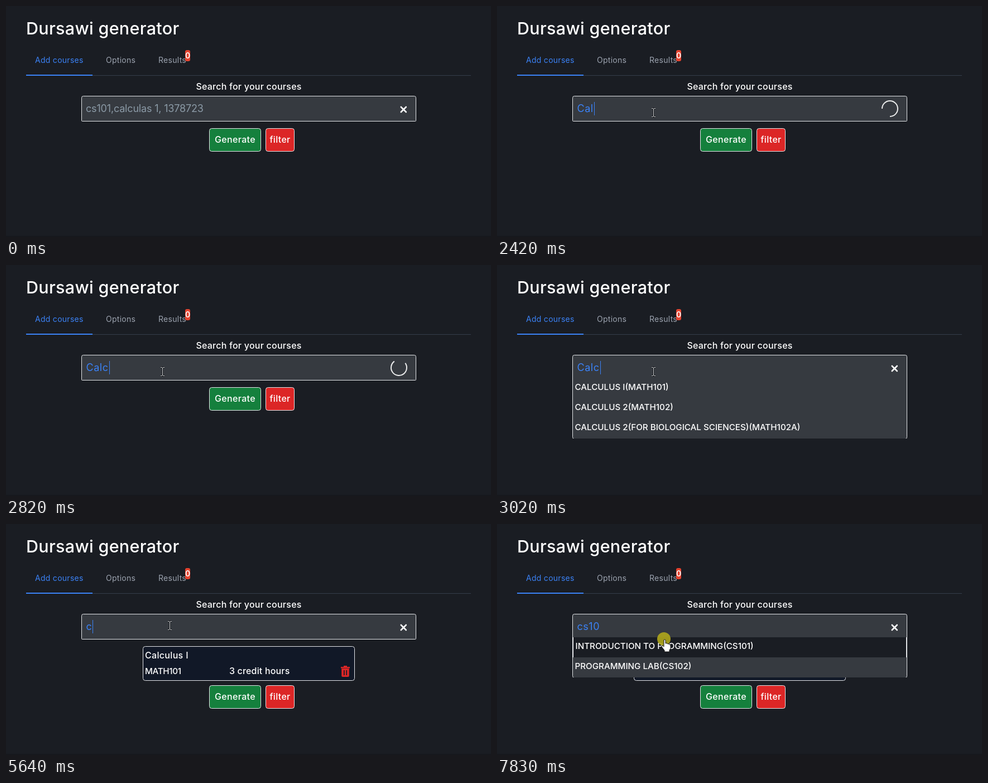
These frames come from a looping animation (869x414 px, 8 s). An HTML page with a canvas:

```html
<!DOCTYPE html>
<html lang="en">
<head>
<meta charset="utf-8">
<title>Course generator</title>
<style>
  html, body { margin: 0; width: 100%; height: 100%; overflow: hidden; background: #1a1d23; }
  canvas { display: block; width: 869px; height: 414px; }
</style>
</head>
<body>
<canvas id="stage" width="869" height="414"></canvas>
<script>
const ctx = document.getElementById("stage").getContext("2d");
const LOOP = 8000;
const FONT = "Inter, 'Open Sans', sans-serif";
const C = {
  bg: "#1a1d23", field: "#363a40", line: "#e4e6e9", rule: "#343e4b", blue: "#3b82f6",
  grey: "#9ca3af", hint: "#8b9aa6", green: "#15803d", red: "#dc2626", card: "#111827", white: "#fff"
};

const MEDICAL = [
  "INRTODUCTION TO MEDICINE AND MEDICAL TERMINOLOGY(MED173)",
  "MOLECULAR GENETICS PRACTICAL(MED211B)",
  "MEDICAL COMMUNICATIONS SKILLS(MED301)",
  "CLINICAL & COMMUNICATION SKILLS(MED411)",
  "ADVANCED CLINICAL PHARMACOLOGY AND THERAPEUTICS(MED751)",
  "BASIC MANAGEMENT OF MEDICAL EMERGENCIES(PARA233)",
  "MEDICAL ETHICS(MED502)"
];
const CALCULUS = [
  "CALCULUS I(MATH101)",
  "CALCULUS 2(MATH102)",
  "CALCULUS 2(FOR BIOLOGICAL SCIENCES)(MATH102A)"
];
const CODING = ["INTRODUCTION TO PROGRAMMING(CS101)", "PROGRAMMING LAB(CS102)"];

// Each step changes only the listed parts of the state.
const STEPS = [
  [0, { typed: "", caret: false, busy: false, list: null, hover: -1, added: false, cursor: null }],
  [200, { cursor: ["arrow", 704, 269] }],
  [400, { cursor: ["arrow", 590, 258] }],
  [600, { cursor: ["arrow", 420, 205] }],
  [800, { cursor: ["beam", 300, 192] }],
  [1010, { cursor: ["beam", 280, 191], caret: true }],
  [1400, { caret: false }],
  [1800, { typed: "C", caret: true }],
  [2220, { typed: "Ca" }],
  [2420, { typed: "Cal", busy: true }],
  [2620, { busy: false, list: MEDICAL }],
  [2820, { typed: "Calc", busy: true, list: null }],
  [3020, { busy: false, list: CALCULUS }],
  [3210, { cursor: ["beam", 277, 195] }],
  [3420, { cursor: ["hand", 270, 212], hover: 0, caret: false }],
  [3620, { cursor: ["hand", 267, 215, true] }],
  [3820, { cursor: ["beam", 267, 221], typed: "", list: null, hover: -1, added: true }],
  [4020, { cursor: ["beam", 286, 196] }],
  [4220, { cursor: ["beam", 293, 182], caret: true }],
  [4840, { caret: false }],
  [5240, { caret: true }],
  [5640, { typed: "c" }],
  [6040, { typed: "cs" }],
  [6240, { typed: "cs1", busy: true }],
  [6440, { typed: "cs10" }],
  [6640, {}],
  [6840, { busy: false, list: CODING }],
  [7040, { caret: false }],
  [7240, { cursor: ["beam", 294, 189] }],
  [7440, { cursor: ["hand", 296, 205], hover: 0, caret: true }],
  [7640, { cursor: ["hand", 299, 207] }],
  [7830, { cursor: ["hand", 299, 207, true], caret: false }]
];

function stateAt(time) {
  const s = {};
  for (const [at, change] of STEPS) {
    if (at > time) break;
    Object.assign(s, change, { at });
  }
  return s;
}

function fill(x, y, w, h, color) {
  ctx.fillStyle = color;
  ctx.fillRect(x, y, w, h);
}

function box(x, y, w, h, color, radius, border = C.line) {
  ctx.beginPath();
  ctx.roundRect(x + 0.5, y + 0.5, w - 1, h - 1, radius);
  ctx.fillStyle = color;
  ctx.fill();
  ctx.lineWidth = 1;
  ctx.strokeStyle = border;
  ctx.stroke();
}

function text(str, x, y, size, color, { weight = 400, gap = 0.02, align = "left" } = {}) {
  ctx.font = `${weight} ${size}px ${FONT}`;
  ctx.letterSpacing = `${gap * size}px`;
  ctx.textAlign = align;
  ctx.fillStyle = color;
  ctx.fillText(str, x, y);
  return ctx.measureText(str).width;
}

function path(points, color, outline, width = 1) {
  ctx.beginPath();
  points.forEach(([x, y]) => ctx.lineTo(x, y));
  ctx.closePath();
  ctx.lineJoin = "round";
  ctx.lineWidth = width;
  ctx.fillStyle = color;
  ctx.fill();
  ctx.strokeStyle = outline;
  ctx.stroke();
}

function header(right) {
  text("Dursawi generator", 36, 51, 30.5, C.white, { weight: 500, gap: 0.01 });
  text("Add courses", 52, 102, 14, C.blue);
  text("Options", 179, 102, 14, C.grey);
  text("Results", 273, 102, 14, C.grey);
  ctx.beginPath();
  ctx.roundRect(321, 79, 9, 20, 3);
  ctx.fillStyle = "#e5432f";
  ctx.fill();
  text("0", 325.5, 94, 14, C.white, { weight: 600, gap: 0, align: "center" });
  fill(36, 124, right - 36, 1, C.rule);
  fill(36, 123, 119, 2, C.blue);
}

function cross(x, y) {
  ctx.beginPath();
  for (const d of [-1, 1]) {
    ctx.moveTo(x - 4.5, y - 4.5 * d);
    ctx.lineTo(x + 4.5, y + 4.5 * d);
  }
  ctx.lineCap = "round";
  ctx.lineWidth = 2.6;
  ctx.strokeStyle = C.white;
  ctx.stroke();
  ctx.lineCap = "butt";
}

function spinner(x, y, turn) {
  const start = Math.PI * (1 + 2 * turn);
  ctx.beginPath();
  ctx.arc(x, y, 14, start, start + Math.PI * 1.5);
  ctx.lineWidth = 2;
  ctx.strokeStyle = "#eceded";
  ctx.stroke();
}

// The open list has a border on three sides only.
function panel(x, height) {
  ctx.save();
  ctx.beginPath();
  ctx.rect(x, 161, 600, height);
  ctx.clip();
  box(x, 161, 600, height + 1, C.field, 3);
  ctx.restore();
}

function search(s, mid) {
  const left = mid - 300;
  const rows = s.list || [];
  text("Search for your courses", mid, 150, 16, C.white, { weight: 500, gap: 0.015, align: "center" });
  if (s.list) panel(left, 42 + 36 * rows.length);
  else box(left, 161, 600, 46, C.field, [3, 3, 1, 1]);
  rows.forEach((row, i) => {
    const y = 203 + 36 * i;
    const on = i === s.hover;
    if (on) {
      fill(left, y, 600, 36, C.line);
      fill(left + 2, y, 596, 36, C.bg);
    }
    text(row, left + (on ? 5.5 : 4.5), y + 21, 15.2, C.white, { weight: 500, gap: 0 });
  });
  let end = left + 9;
  if (s.typed) end += text(s.typed, left + 8.5, 190, 18, C.blue, { gap: 0.03 }) + 0.5;
  else text("cs101,calculas 1, 1378723", left + 8, 190, 18, C.hint, { gap: -0.01 });
  if (s.caret) fill(Math.round(end), 172, 1, 24, C.blue);
  if (s.busy) spinner(left + 569, 184, (s.at - 2420) / 1000);
  else cross(left + 577.3, 185.5);
}

function trash(x, y) {
  fill(x, y + 2, 16, 2.5, C.red);
  fill(x + 5, y, 6, 3, C.red);
  ctx.beginPath();
  ctx.roundRect(x + 1.2, y + 5, 13.6, 15, [0, 0, 2, 2]);
  ctx.fillStyle = C.red;
  ctx.fill();
  fill(x + 5, y + 8, 1.6, 9, C.card);
  fill(x + 9.4, y + 8, 1.6, 9, C.card);
}

function course() {
  box(245, 219, 380, 62, C.card, 4);
  text("Calculus I", 249, 241, 16, C.white, { weight: 500 });
  text("MATH101", 249, 269, 15.2, C.white, { weight: 500, gap: -0.02 });
  text("3 credit hours", 400, 269, 16, C.white, { weight: 500, gap: 0.01 });
  trash(600, 254);
}

function buttons(mid, y) {
  const label = { weight: 500, align: "center" };
  box(mid - 71, y, 93, 42, C.green, 4);
  text("Generate", mid - 24.5, y + 26, 16, C.white, label);
  box(mid + 30, y, 52, 42, C.red, 4);
  text("filter", mid + 56, y + 26, 16, C.white, label);
}

function scrollbar() {
  fill(857, 0, 12, 414, "#f1f1f1");
  fill(859, 0, 10, 414, "#c1c1c1");
}

function beam() {
  const stroke = (color, width) => {
    ctx.beginPath();
    ctx.moveTo(-3, -7.5); ctx.lineTo(-1, -7.5); ctx.lineTo(0.5, -6.5);
    ctx.lineTo(2, -7.5); ctx.lineTo(4, -7.5);
    ctx.moveTo(0.5, -6.5); ctx.lineTo(0.5, 6.5);
    ctx.moveTo(-3, 7.5); ctx.lineTo(-1, 7.5); ctx.lineTo(0.5, 6.5);
    ctx.lineTo(2, 7.5); ctx.lineTo(4, 7.5);
    ctx.lineWidth = width;
    ctx.strokeStyle = color;
    ctx.stroke();
  };
  stroke("#17191d", 3);
  stroke("#d5d7da", 1);
}

function arrow() {
  path([[0, 0], [0, 16], [4, 12.5], [6.5, 18], [9, 17], [6.6, 11.5], [11.5, 11.5]], C.white, "#000");
}

function hand() {
  path([
    [0, 1], [1.5, 0], [3, 1], [3, 7], [5.5, 6.5], [6.5, 8], [8.5, 7.6], [9.5, 9], [11.5, 9.5],
    [12, 11], [12, 16], [10, 19], [10, 22], [1, 22], [1, 19.5], [-4, 13], [-3.5, 11], [-2, 11], [0, 13]
  ], C.white, "#111");
}

const pointers = { beam, arrow, hand };

function pointer([kind, x, y, click]) {
  if (click) {
    ctx.beginPath();
    ctx.arc(x, y - 1, 12, 0, Math.PI * 2);
    ctx.fillStyle = "rgba(176, 168, 28, 0.9)";
    ctx.fill();
  }
  ctx.save();
  ctx.translate(x, y);
  pointers[kind]();
  ctx.restore();
}

function draw(time) {
  const s = stateAt(time);
  const scroll = s.list === MEDICAL;
  const mid = scroll ? 426 : 435;
  fill(0, 0, 869, 414, C.bg);
  fill(0, 412, 869, 2, "#16181d");
  header(scroll ? 816 : 833);
  if (s.added) course();
  if (!scroll) buttons(mid, s.added ? 289 : 219);
  search(s, mid);
  if (scroll) scrollbar();
  if (s.cursor) pointer(s.cursor);
}

const begin = performance.now();
function tick() {
  draw((performance.now() - begin) % LOOP);
  requestAnimationFrame(tick);
}
tick();
</script>
</body>
</html>
```
